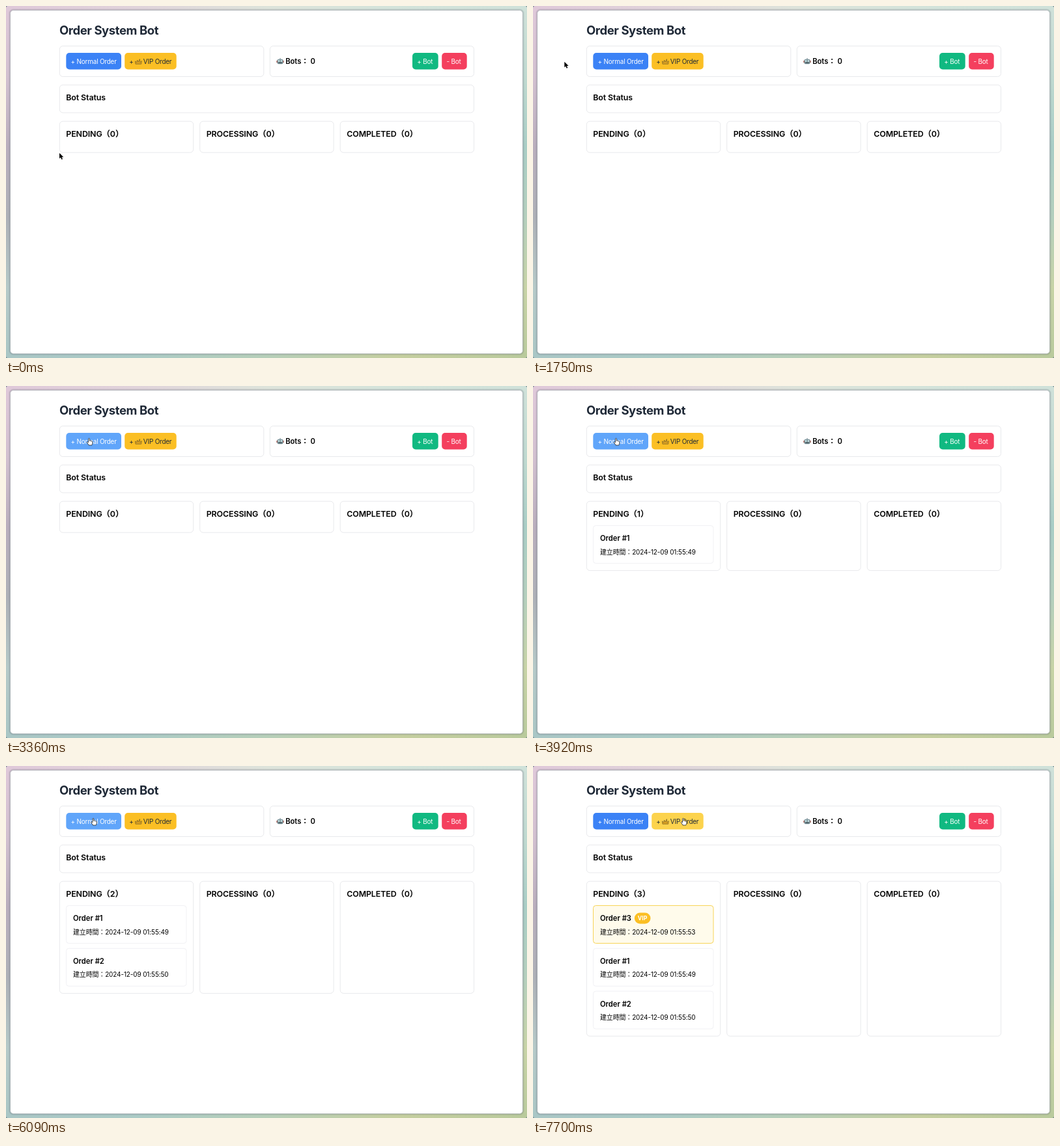
Animation of 800x541 px, one loop 8000 ms. Source, as an HTML page:

```html
<!DOCTYPE html>
<html lang="zh-Hant">
<head>
<meta charset="utf-8">
<title>Order System Bot</title>
<style>
  html, body { margin: 0; width: 100%; height: 100%; overflow: hidden; background: #6f858b; }
  svg { display: block; width: 100vw; height: 100vh; }
  text { font-family: Inter, "Noto Sans CJK TC", "Noto Sans CJK JP", "Noto Sans CJK", sans-serif; white-space: pre; }
  .title { font-size: 18.5px; font-weight: 700; letter-spacing: -.42px; fill: #1f2937; }
  .head { font-size: 12.4px; font-weight: 600; letter-spacing: -.1px; }
  .sub { font-size: 11.2px; font-weight: 600; }
  .body { font-size: 9.94px; letter-spacing: -.09px; }
  .btn { font-size: 9.94px; letter-spacing: -.2px; }
  .badge { font-size: 8.7px; font-weight: 700; fill: #fff; text-anchor: middle; }
  .card { fill: #fff; stroke: #e8e9ec; }
  .item { fill: #fff; stroke: #f1f1f4; }
  .item.vip { fill: #fffbeb; stroke: #f7d458; }
</style>
</head>
<body>
<svg id="stage" viewBox="0 0 800 541" preserveAspectRatio="none"></svg>
<script>
const LOOP = 8000, STEP = 70, PITCH = 65.8;
const stage = document.getElementById('stage');

const rect = (x, y, w, h, r, attrs = '') =>
  `<rect x="${x}" y="${y}" width="${w}" height="${h}" rx="${r}" ${attrs}/>`;
const text = (x, y, cls, str, attrs = '') =>
  `<text x="${x}" y="${y}" class="${cls}" ${attrs}>${str}</text>`;
const card = (x, y, w, h, attrs = '') => rect(x, y, w, h, 5, `class="card" ${attrs}`);
const gradient = (id, vertical, colors) =>
  `<linearGradient id="${id}" x1="0" y1="0" x2="${vertical ? 0 : 1}" y2="${vertical ? 1 : 0}">` +
  colors.map((c, i) => `<stop offset="${i / (colors.length - 1)}" stop-color="${c}"/>`).join('') +
  '</linearGradient>';

const buttons = [
  { id: 'normal', x: 92.3, w: 84.7, fill: '#3b82f6', hover: '#60a5fa' },
  { id: 'vip', x: 182.2, w: 79.5, fill: '#fbbf24', hover: '#fcd34d' },
  { id: 'add', x: 624, w: 39.7, fill: '#10b981' },
  { id: 'remove', x: 669.2, w: 38.5, fill: '#f43f5e' }
];
const columns = [
  { name: 'PENDING', x: 82.3 },
  { name: 'PROCESSING', x: 297.7 },
  { name: 'COMPLETED', x: 513.2 }
];
const orders = [
  { no: 1, at: 3780, sec: 49 },
  { no: 2, at: 4410, sec: 50 },
  { no: 3, at: 7490, sec: 53, vip: true }
];

function backdrop() {
  return '<defs>' +
    gradient('top', false, ['#dfc8d9', '#e0d3da', '#dde3da', '#d3e3da', '#cfe1d9']) +
    gradient('left', true, ['#dfc8d9', '#d2c0d0', '#b9aebd', '#adb0b7', '#b5c9c8', '#a9c6c5']) +
    gradient('right', true, ['#cfe1d9', '#bfd9d0', '#a9cdc5', '#b4cfbd', '#c7d3a6', '#b9ca9c']) +
    gradient('bottom', false, ['#a9c6c5', '#abcbc6', '#b6cfb9', '#c5cf9f', '#b9ca9c']) +
    '<clipPath id="round"><rect width="800" height="541" rx="4"/></clipPath></defs>' +
    '<g clip-path="url(#round)">' +
    rect(0, 0, 400, 541, 0, 'fill="url(#left)"') +
    rect(400, 0, 400, 541, 0, 'fill="url(#right)"') +
    rect(0, 0, 800, 7, 0, 'fill="url(#top)"') +
    rect(0, 534, 800, 7, 0, 'fill="url(#bottom)"') + '</g>' +
    rect(5.5, 5.5, 789, 530, 5.5, 'fill="none" stroke="#4b5563" stroke-opacity=".16" stroke-width="2"') +
    rect(6.5, 6.5, 787, 528, 5, 'fill="#fff" stroke="#8f959b" stroke-opacity=".55"');
}

const robot = `<g transform="translate(421 85.3)">
  <path d="M-.5-5.2h1v2h-1z" fill="#657d84"/>
  <rect x="-5.6" y="-1.6" width="11.2" height="3.6" rx="1" fill="#a3463b"/>
  <rect x="-4.5" y="-3.6" width="9" height="7.6" rx="2" fill="#7d979e"/>
  <circle cx="-2" cy="-.9" r="1.2" fill="#d8f1f0"/><circle cx="2" cy="-.9" r="1.2" fill="#d8f1f0"/>
  <path d="M-2.6 2h5.2" stroke="#39474c" stroke-width="1.2"/></g>`;

const crown = `<path transform="translate(203.3 85.6)" d="M-4.4 3.6L-5-.8L-2.6 1L-1.8-2.6L0 .4L2-4L2.8 1L5-1.2L4.4 3.6Z"
  fill="#d9a021" stroke="#76602a" stroke-width=".7"/>`;

const arrow = `<path id="arrow" d="M0 0V8.6L2-.2L2 6.7L3.4 10L5 9.3L3.6 6.2H6.3Z" fill="#000" stroke="#fff" stroke-width=".8" paint-order="stroke"/>`
  .replace('L2-.2L2 6.7', 'L2 6.7');

const hand = `<path id="hand" d="M-1 .8C-1-.4 .8-.4 .8.8V3.8C1.2 3.2 2.2 3.3 2.4 4C2.9 3.5 3.8 3.8 3.9 4.5
  C4.5 4.2 5.2 4.6 5.2 5.4V7.4C5.2 8.6 4.4 9.2 4.2 10.5H-.6C-.9 9.2-2.4 7.9-3.2 6.4C-3.6 5.5-2.5 4.9-1.9 5.5L-1 6.4Z"
  fill="#fff" stroke="#222" stroke-width=".8" stroke-linejoin="round"/>`;

function orderCard(o) {
  return `<g id="order${o.no}">` +
    rect(92.5, 214.5, 184.5, 58, 4, `class="item ${o.vip ? 'vip' : ''}"`) +
    text(103, 238, 'sub', 'Order #' + o.no) +
    (o.vip ? rect(155.8, 225.4, 24.7, 17, 8.5, 'fill="#fbbf24"') + text(168.1, 237, 'badge', 'VIP') : '') +
    text(103, 258.6, 'body', `建立時間：2024-12-09 01:55:${o.sec}`) + '</g>';
}

stage.innerHTML = backdrop() +
  text(82, 44.3, 'title', 'Order System Bot') +
  card(82.3, 61.5, 313.5, 47) + card(405.3, 61.5, 313.2, 47) +
  card(82.3, 121.3, 636.2, 42.7) +
  buttons.map(b => rect(b.x, 72, b.w, 25.5, 5, `id="${b.id}" fill="${b.fill}"`)).join('') +
  text(99.6, 88.6, 'btn', '+ Normal Order', 'fill="#fff"') +
  text(189.3, 88.6, 'btn', '+', 'fill="#1f2937"') + crown +
  text(210.8, 88.6, 'btn', 'VIP Order', 'fill="#1f2937"') +
  text(631.3, 88.6, 'btn', '+ Bot', 'fill="#fff"') +
  text(676.6, 88.6, 'btn', '- Bot', 'fill="#fff"') +
  robot + text(429.2, 89, 'sub', 'Bots： 0') +
  text(92.3, 144.8, 'head', 'Bot Status') +
  columns.map(c => card(c.x, 177.2, 205.4, 48, `id="${c.name}"`) +
    text(c.x + 10, 200.8, 'head', c.name + '（0）', `id="${c.name}-label"`)).join('') +
  orders.map(orderCard).join('') +
  `<g id="cursor">${arrow}${hand}</g>`;

const el = id => document.getElementById(id);
const show = (id, on) => el(id).setAttribute('display', on ? 'inline' : 'none');

// Pointer trips: start, end, destination
const trips = [
  [1120, 1960, 46, 76.4],
  [2170, 3010, 125.5, 81.5],
  [3010, 3150, 126.6, 80.8],
  [3220, 3360, 127.6, 80.5],
  [5950, 6510, 230.6, 80.5]
];
const ease = p => p < .5 ? 4 * p ** 3 : 1 - (2 - 2 * p) ** 3 / 2;

function pointerAt(t) {
  let x = 82, y = 226;
  for (const [from, to, tx, ty] of trips) {
    const k = ease(Math.min(1, Math.max(0, (t - from) / (to - from))));
    x += (tx - x) * k;
    y += (ty - y) * k;
  }
  return [x, y];
}

function render(time) {
  const t = Math.floor(time / STEP) * STEP;
  const [x, y] = pointerAt(t);
  const over = buttons.find(b => x >= b.x && x <= b.x + b.w && y >= 72 && y <= 97.5);
  buttons.forEach(b => el(b.id).setAttribute('fill', b === over && b.hover || b.fill));
  el('cursor').setAttribute('transform', `translate(${x.toFixed(2)} ${y.toFixed(2)})`);
  show('arrow', !over);
  show('hand', over);

  // VIP orders go to the front of the queue
  const queue = orders.filter(o => t >= o.at).sort((a, b) => !!b.vip - !!a.vip);
  orders.forEach(o => {
    const i = queue.indexOf(o);
    show('order' + o.no, i >= 0);
    el('order' + o.no).setAttribute('transform', `translate(0 ${Math.max(0, i) * PITCH})`);
  });
  const n = queue.length;
  el('PENDING-label').textContent = `PENDING（${n}）`;
  columns.forEach(c => el(c.name).setAttribute('height', n ? 40.6 + n * PITCH : 48));
}

const start = performance.now();
function tick() {
  render((performance.now() - start) % LOOP);
  requestAnimationFrame(tick);
}
tick();
</script>
</body>
</html>
```
